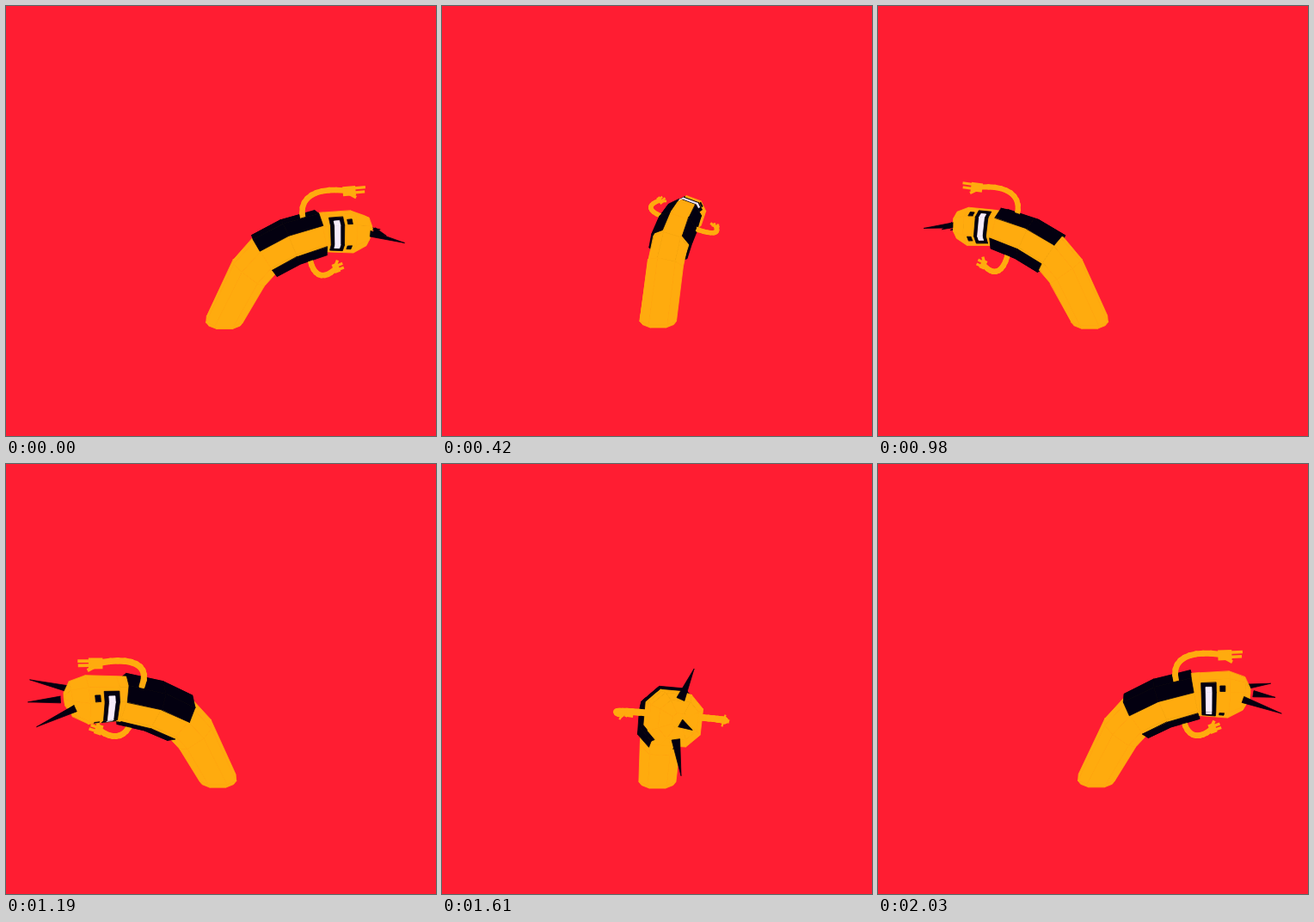
These frames come from a looping animation (500 by 500 pixels, 2.1 s). An HTML page with a canvas:

```html
<!DOCTYPE html>
<html lang="en">
<head>
<meta charset="utf-8">
<title>Headbanger</title>
<style>
html, body { margin: 0; width: 100%; height: 100%; overflow: hidden; background: #ff1d32; }
canvas { display: block; }
</style>
</head>
<body>
<canvas id="stage" width="500" height="500"></canvas>
<script>
const ctx = document.getElementById('stage').getContext('2d');
const RED = '#ff1d32', SKIN = '#ffab0e', INK = '#030010', TEETH = '#f6ecfb';
const STEP = 70, STEPS = 30, CAMERA = 560, HORIZON = 158;

// Spine rings: reach along the bend, height, tilt in degrees, radius, lift when leaning forward
const SPINE = [
  [4, 368.5, 0, 18, 0],
  [4, 364, 0, 21, 0],
  [32, 310, 36, 21.5, 0],
  [50, 290, 57, 22, 0],
  [80, 274, 68, 22, 0],
  [116, 263, 79, 21, 0],
  [122, 262.5, 88, 21, 0],
  [152, 262, 93, 22.5, 2],
  [168, 261, 95, 16, 5],
  [174, 261, 95, 6, 6]
];
// Octagonal cross-section; side 0 is the front
const SIDES = [[-.5, 1], [.5, 1], [1, .5], [1, -.5], [.5, -1], [-.5, -1], [-1, -.5], [-1, .5]];

let bx, bz, lean, spread, items;

const mix = (a, b, t) => a + (b - a) * t;

function ringAt(q) {
  const i = Math.min(Math.floor(q), SPINE.length - 2);
  return SPINE[i].map((v, k) => mix(v, SPINE[i + 1][k], q - i));
}

// Ring-local offset (side, along the spine, front) to stage position
function place([reach, height, tilt, , lift], x, along, z) {
  const a = tilt * Math.PI / 180, s = Math.sin(a), c = Math.cos(a);
  const part = x * bx + z * bz, out = reach + along * s + part * (c - 1);
  const X = x + out * bx, Z = z + out * bz;
  const Y = height - lift * lean - along * c + part * s;
  const scale = CAMERA / (CAMERA - Z);
  return {
    x: 250 + X * scale, y: HORIZON + (Y - HORIZON) * scale, scale,
    depth: Math.hypot(X, Y - HORIZON, CAMERA - Z)
  };
}

const meanDepth = pts => pts.reduce((sum, p) => sum + p.depth, 0) / pts.length;

function trace(pts) {
  ctx.beginPath();
  pts.forEach(p => ctx.lineTo(p.x, p.y));
}

function face(pts, color, bias = 0, bothSides = false) {
  let area = 0;
  pts.forEach((p, i) => {
    const n = pts[(i + 1) % pts.length];
    area += p.x * n.y - n.x * p.y;
  });
  const away = area >= 0;
  if (away && !bothSides) return;
  items.push({
    depth: meanDepth(pts) - (away ? -bias : bias),
    draw() {
      trace(pts);
      ctx.closePath();
      ctx.fillStyle = ctx.strokeStyle = color;
      ctx.lineWidth = .8;
      ctx.fill();
      ctx.stroke();
    }
  });
}

function limb(pts, width, cap = 'round') {
  items.push({
    depth: meanDepth(pts) - 8,
    draw() {
      trace(pts);
      ctx.strokeStyle = SKIN;
      ctx.lineCap = cap;
      ctx.lineWidth = width * pts[0].scale;
      ctx.stroke();
    }
  });
}

function tube(from, to, color, grow = 0, firstSide = 0, bias = 0) {
  for (let i = from; i < to; i++) {
    for (let j = firstSide; j < 8; j++) {
      const corner = (n, side) => {
        const ring = SPINE[n], r = ring[3] + grow, [x, z] = SIDES[side % 8];
        return place(ring, x * r, 0, z * r);
      };
      face([corner(i, j), corner(i, j + 1), corner(i + 1, j + 1), corner(i + 1, j)],
        color, bias, grow > 0);
    }
  }
}

// Flat marking that follows the surface of the head
function patch(q0, q1, x0, x1, color, bias) {
  const on = (q, x) => {
    const ring = ringAt(q), r = ring[3] + .5;
    return place(ring, x * r, 0, Math.min(1, 1.5 - Math.abs(x)) * r);
  };
  face([on(q0, x0), on(q0, x1), on(q1, x1), on(q1, x0)], color, bias);
}

function drawFace() {
  const strip = (q0, q1, edge, color, bias) => {
    const cuts = [-edge, -.5, .5, edge];
    for (let i = 0; i < 3; i++) patch(q0, q1, cuts[i], cuts[i + 1], color, bias);
  };
  strip(6.03, 6.53, .86, INK, 8);
  strip(6.18, 6.38, .7, TEETH, 14);
  patch(6.66, 6.83, .54, .74, INK, 8);
  patch(6.66, 6.83, -.74, -.54, INK, 8);
}

function drawArm(side) {
  const shoulder = [99, 268, 80, 0, 0];
  const length = 57 - side * 18 * bx, swing = -side * 10 * bx;
  const at = (out, along) => place(shoulder, side * out, along, swing * along / length);
  const curve = t => {
    const u = 1 - t, k = [u * u * u, 3 * u * u * t, 3 * u * t * t, t * t * t];
    return at(20 * k[0] + 48 * k[1] + 54 * k[2] + 46 * k[3],
      -2 * k[1] + length * (.3 * k[2] + .68 * k[3]));
  };
  for (let i = 0; i < 10; i++) limb([curve(i / 10), curve((i + 1) / 10)], 6.5);
  const finger = (x0, a0, x1, a1, width) =>
    limb([at(x0, a0 * length), at(x1, a1 * length)], width, 'butt');
  finger(45, .66, 44, .85, 11);
  finger(47, .8, 46, 1, 3.2);
  finger(42, .8, 41, .98, 3.2);
  finger(43, .72, 36, .84, 3.5);
}

function drawSpike(row) {
  const lift = 20 * lean, inner = row === 0;
  const root = place([inner ? 178 : 166, 261 - lift / 4, 95, 0, 0], 0, 0, row * 17 * spread);
  const tip = place([inner ? 192 + 40 * lean : 198 + 14 * lean, 267 - lift, 95, 0, 0],
    0, 0, row * 40 * spread);
  const dx = tip.x - root.x, dy = tip.y - root.y;
  const k = 3.4 * root.scale / Math.hypot(dx, dy);
  const edge = s => ({ ...root, x: root.x - s * dy * k, y: root.y + s * dx * k });
  face([edge(1), edge(-1), tip], INK, 0, true);
}

function render(now) {
  const turn = Math.floor(now / STEP) % STEPS / STEPS * 2 * Math.PI;
  bx = Math.cos(turn);
  bz = -Math.sin(turn);
  lean = Math.max(0, bz);
  spread = 1 + Math.min(0, bz); // spikes fold together when thrown back
  items = [];

  tube(0, SPINE.length - 1, SKIN);
  const top = SPINE[SPINE.length - 1];
  face(SIDES.map(([x, z]) => place(top, x * top[3], 0, z * top[3])), SKIN);
  tube(3, 5, INK, 3, 1, 4);
  drawFace();
  [-1, 1].forEach(drawArm);
  [-1, 0, 1].forEach(drawSpike);

  ctx.fillStyle = RED;
  ctx.fillRect(0, 0, 500, 500);
  items.sort((a, b) => b.depth - a.depth).forEach(item => item.draw());
}

const start = performance.now();
function tick() {
  render(performance.now() - start);
  requestAnimationFrame(tick);
}
tick();
</script>
</body>
</html>
```
